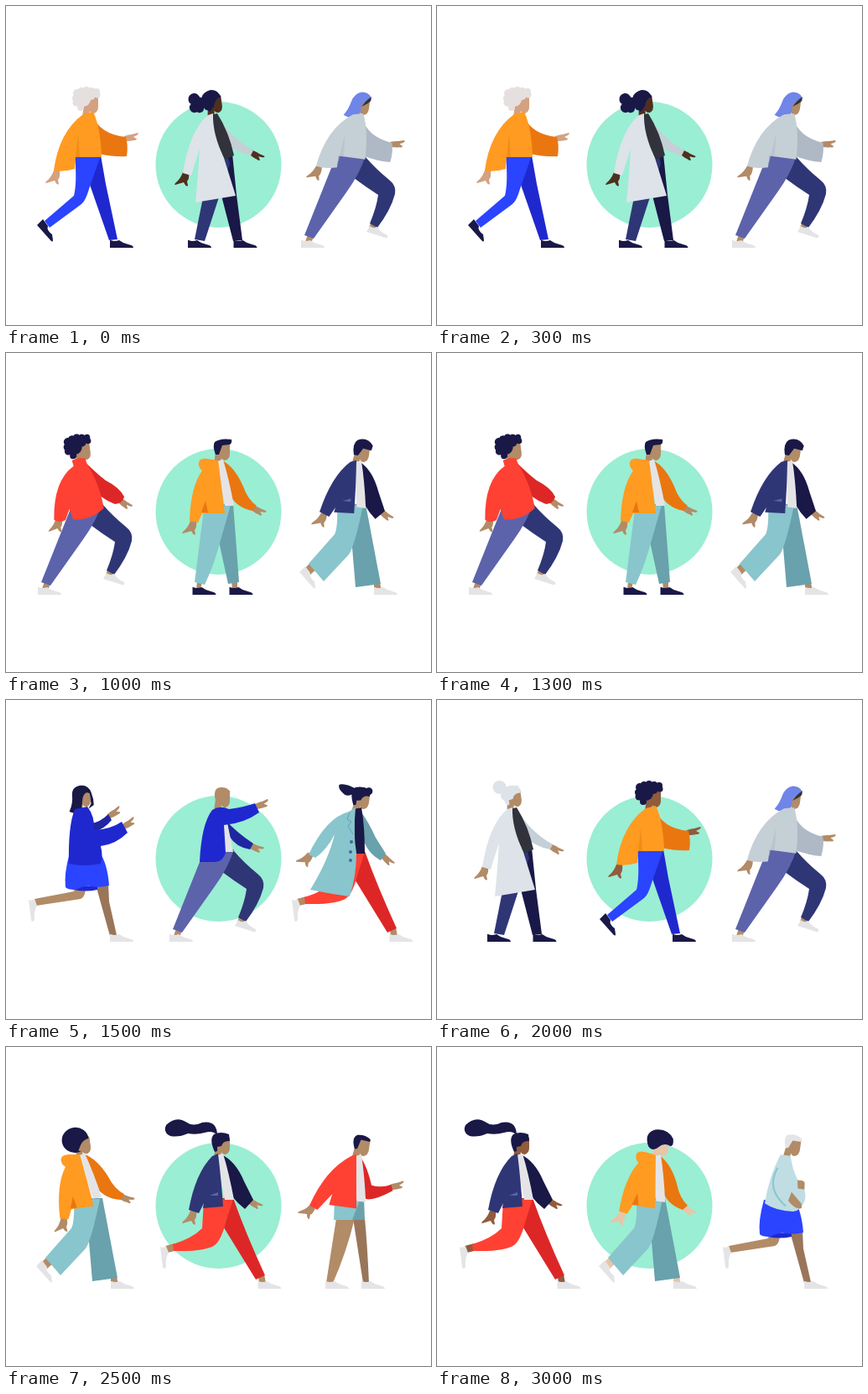
Recreate the animation shown at these times as an HTML page. Size 507 px wide and 380 px high, loop 3.5 s.

```html
<!DOCTYPE html>
<html lang="en">
<head>
<meta charset="utf-8">
<title>People walking</title>
<style>
html, body { margin: 0; height: 100%; overflow: hidden; background: #fff; }
svg { display: block; width: 100vw; height: 100vh; }
</style>
</head>
<body>
<svg id="stage" viewBox="0 0 507 380"></svg>
<script>
const navy = '#191847', indigo = '#2f3676', violet = '#5c63ab', blue = '#2b44ff', royal = '#1f28cf',
  red = '#ff4133', crimson = '#dd2727', orange = '#ff9b21', amber = '#ea7610', teal = '#89c5cc',
  sea = '#69a1ac', white = '#e4e4e6', pale = '#dde3e9', silver = '#c5cfd6', coal = '#31323b',
  tan = '#b28b67', shade = '#997659', brown = '#915b3c', dark = '#4f2f1f', peach = '#d4a181', fair = '#e8c4a8';

const p = (fill, d) => `<path fill="${fill}" d="${d}"/>`;
const at = (x, y, r, s) => `<g transform="translate(${x} ${y}) rotate(${r})">${s}</g>`;
const tilt = (deg, s) => `<g transform="rotate(${deg} 251 185)">${s}</g>`;
const dots = (fill, ...list) => list.map(([x, y, r]) => `<circle cx="${x}" cy="${y}" r="${r}" fill="${fill}"/>`).join('');

// Hands start at the wrist: one hangs behind, one reaches forward.
const hang = (c, x, y, r = 0) => at(x, y, r, p(c, 'M-4-2L3-3Q4 6 1 9L2 14Q0 16-3 10L-13 13Q-15 13-12 10Q-7 6-4-2Z'));
const reach = (c, x, y, r = 0) => at(x, y, r, p(c, 'M-2-3Q4-5 7-5L14-7Q16-6 13-4L9-2L13 0Q13 2 9 2Q6 3-2 3Z'));

const shoe = (c, x) => at(x, 278, 0, p(c, 'M0 1V10H28Q28 7 22 6Q16 5 11 1Q5 3 1 1Z'));
const toeOff = (c, x) => at(x, 254, 0, p(c, 'M7 0L0 7L16 25Q19 28 19 25L18 18Q11 13 13 8Z'));
const kick = p(white, 'M184 238Q188 240 191 237L194 245Q190 251 191 262Q188 266 187 262Z');

const legs = {
  slim: () => p(royal, 'M255 178H270L276 212L290 278L280 279L257 213Z') +
    p(blue, 'M239 178Q242 210 238 226L203 256L209 264L247 236Q252 232 256 218L270 178Z') +
    toeOff(navy, 194) + shoe(navy, 281),
  coat: () => p(navy, 'M257 176H270L275 225L282 279L271 280L257 226Z') +
    p(indigo, 'M243 176H264L267 188L237 280L225 278L235 228Z') + shoe(navy, 217) + shoe(navy, 271.5),
  lunge: c => p(c, 'M203 272L210 274L207 283L200 281ZM279 256L286 261L281 268L276 264Z') +
    p(indigo, 'M256 180H272Q284 194 300 207Q309 214 307 224Q302 243 286 264L277 259Q285 240 287 225L272 215L254 202Z') +
    p(violet, 'M237 178H272Q265 200 249 222L210 277L199 273Z') + shoe(white, 195) +
    p(white, 'M277 262L273 269L295 276Q299 277 298 273Q289 269 286 263Q282 266 277 262Z'),
  shorts: c => p(shade, 'M257 204H271Q274 235 276 281H269Z') + p(c, 'M237 204H259Q249 245 233 281H225Z') +
    p(sea, 'M255 180H270L271 206H254Z') + p(teal, 'M235 180H266L256 206H234Z') + shoe(white, 224) + shoe(white, 267),
  skirt: c => p(c, 'M239 222H252Q252 235 246 237L193 245L191 237L238 228Z') + kick +
    p(shade, 'M264 220L279 218L280 240L289 280L281 281Z') +
    p(royal, 'M232 222H266V226Q252 229 238 226Z') +
    p(blue, 'M233 182H269Q278 195 280 221Q270 224 258 222Q250 221 240 226Q230 226 228 223Q226 207 233 182Z') + shoe(white, 281),
  straight: c => p(c, 'M228 272H234L232 282H227ZM269 272H276V282H270Z') + p(sea, 'M253 180H271L278 273L265 275L253 220Z') +
    p(teal, 'M236 186L225 273L237 276Q247 255 254 230L268 181Z') + shoe(navy, 222.5) + shoe(navy, 266.5),
  wide: c => p(c, 'M206 250L214 257L206 264L199 257ZM282 274H289L291 282H282Z') +
    p(sea, 'M255 180H272L290 275L260 279L255 220Z') +
    p(teal, 'M238 182Q239 208 235 216L204 251L222 272L252 240Q259 230 269 181Z') + toeOff(white, 193) + shoe(white, 282),
  jog: c => p(c, 'M190 237L201 234V243L193 245ZM301 273L308 271L310 281L302 282Z') + kick +
    p(crimson, 'M256 180H271Q286 222 309 272L298 277L258 212Z') +
    p(red, 'M236 182L234 216Q222 228 199 235L200 243Q238 244 249 236Q257 230 263 206L271 181Z') + shoe(white, 300.5),
};

const shirt = p(white, 'M251 129L259 127Q266 150 272 182H261Z');
const poncho = (main, side, fold) => c => hang(c, 218, 198) + reach(c, 300, 158) +
  p(side, 'M260 130Q269 153 300 156Q303 167 301 179Q286 180 268 176Z') +
  p(main, 'M249 129L261 126Q270 145 271 180H239V194Q226 198 214 196Q220 150 249 129Z') + p(fold, 'M243 152L245 180H239V191Z');

// Each top: [tilt it is drawn at, drawing for a skin colour]
const tops = {
  poncho: [0, poncho(orange, amber, '#f18c18')],
  shawl: [0, poncho(silver, '#afb9c5', '#b9c4cd')],
  coat: [-8, c => hang(c, 215, 200) + reach(c, 293, 175, 40) +
    p(silver, 'M252 130Q268 157 295 172L292 178Q274 175 258 160Z') +
    p(coal, 'M244 130L252 128Q266 150 272 178L261 183L250 160Z') +
    p(pale, 'M241 130L247 128Q246 152 260 181L274 226Q250 230 226 234Q229 204 231 170L221 202L211 199Q219 148 241 130Z')],
  turtle: [8, c => hang(c, 218, 190, 12) + reach(c, 294, 188, 62) +
    p(crimson, 'M266 131Q276 149 284 160Q298 173 300 185Q295 192 287 190Q270 178 266 160Z') +
    p(red, 'M252 126Q260 124 268 128L268 134Q276 162 273 191Q254 201 234 194L233 181L225 192Q217 194 212 188Q224 143 252 133Z')],
  bump: [-8, c => p('#bfdde3', 'M237 130L249 128Q255 142 264 152Q279 160 280 174Q279 188 270 191Q250 196 235 191Q231 160 237 130Z') +
    '<path fill="none" stroke="#89c5cc" stroke-width="2" d="M238 146Q231 174 260 187"/>' +
    p(c, 'M265 154Q271 151 274 154L276 162L268 163ZM262 169L277 179L279 184Q273 189 261 180Z')],
  jacket: [0, c => hang(c, 210, 197, 16) + reach(c, 300, 160, -10) +
    p(crimson, 'M258 129Q268 140 276 161Q288 163 299 157L302 164Q280 180 271 178Q264 172 261 160Z') + shirt +
    p(red, 'M247 130L253 127Q256 150 262 191H229L231 178L216 199L206 195Q219 150 247 130Z')],
  hoodie: [0, c => hang(c, 224, 202) + reach(c, 295, 185, 38) +
    p(amber, 'M258 128Q273 136 283 159Q288 174 299 182L294 188Q273 184 265 165Z') + shirt +
    p(orange, 'M230 130Q232 125 240 126L253 128Q256 150 261 191H234L229 202L219 200Q220 160 234 140Q229 136 230 130Z') +
    p(amber, 'M238 176L241 190H233Z')],
  blazer: [0, c => hang(c, 224, 197) + reach(c, 291, 184, 40) +
    p(navy, 'M257 128Q274 136 284 160L295 182L285 193Q268 180 264 165Z') + shirt +
    p(indigo, 'M246 130L253 127Q257 160 259 190L235 192L236 186L230 198L218 194Q226 150 246 130Z') +
    p(violet, 'M243 177L253 173V177Z')],
  sweater: [-8, c => reach(c, 281, 138, -22) + reach(c, 298, 151, -22) + p('#2026a2', 'M258 147Q269 146 279 136L283 143Q274 154 262 157Z') +
    p(royal, 'M239 130L254 127Q263 138 262 155Q282 154 295 145L302 158Q288 172 270 174Q273 186 270 195Q250 199 232 195Q231 150 239 130Z')],
  pointing: [0, c => reach(c, 299, 127, -8) + reach(c, 292, 174, 32) +
    p('#2026a2', 'M262 143Q274 157 295 171L291 178Q274 175 267 163Z') + p(white, 'M257 144L264 146L271 181H258Z') +
    p(royal, 'M246 131Q255 125 266 130Q283 128 297 123L302 134Q284 147 260 149L262 182Q259 192 250 193H231Q233 148 246 131Z')],
  trench: [8, c => hang(c, 206, 185, 20) + reach(c, 293, 186, 55) +
    p(sea, 'M265 131Q276 146 284 164L296 183L290 191Q273 182 268 162Z') + p(navy, 'M258 130L267 128Q271 150 271 183H259Z') +
    p(teal, 'M252 133L260 128Q257 160 261 182Q261 210 253 234Q230 231 206 226Q228 190 235 160Q226 178 212 188L204 184Q225 140 252 133Z') +
    '<path fill="none" stroke="#69a1ac" d="M253 134L250 142L255 145L251 150L257 160"/>' + dots('#4a62a8', [255, 169, 2], [254, 181, 2], [254, 191, 2])],
};

const face = c => p(c, 'M248 132L250 118Q248 107 256 106L267 108V120Q267 126 262 128Q258 128 257 125L256 131Z');
const cap = c => p(c, 'M249 125Q242 110 248 104Q256 100 266 104L267 112Q259 111 257 118L252 119L252 124Z');
const curls = c => dots(c, [242, 104, 5], [247, 101, 4], [253, 100, 4], [259, 101, 4], [265, 102, 4], [266, 106, 3.5],
  [240, 110, 4], [241, 115, 4.5], [246, 121, 4], [249, 111, 9], [258, 106, 6]);

const hair = {
  curls: () => curls(navy),
  greyCurls: () => curls('#e5e0df'),
  blond: () => dots('#ecdcbf', [243, 103, 8], [241, 113, 6], [250, 110, 9], [254, 104, 6], [263, 106, 6], [247, 119, 5]),
  lowBun: () => dots(navy, [235, 108, 7], [234, 118, 6], [242, 114, 7], [240, 120, 5]) + p(navy, 'M246 122Q238 103 255 100Q264 100 267 110Q260 110 257 120L252 125Z'),
  topBun: () => cap(navy) + dots(navy, [247, 104, 7]),
  greyBun: () => cap(pale) + dots(pale, [243, 102, 8], [249, 113, 6]),
  beard: () => p(navy, 'M247 123Q242 107 249 103Q256 101 262 103V108Q257 109 256 115L260 120Q266 116 267 119V126Q258 129 254 121Z'),
  flat: () => p(navy, 'M250 121Q246 110 249 106Q256 101 269 103Q270 107 267 109L258 110L254 121Z'),
  crop: () => p(navy, 'M249 121Q245 108 251 103Q262 97 270 107L269 113L259 112L254 121Z'),
  bob: () => p(navy, 'M240 131Q246 121 246 112Q247 101 259 102Q267 103 269 112Q271 120 270 127L263 131L267 125V113Q262 108 258 117L254 133Q246 135 240 131Z'),
  bald: c => p(c, 'M250 120Q246 104 257 104Q267 104 267 112V120Z'),
  pony: () => cap(navy) + dots(navy, [265, 106, 4.5]) + p(navy, 'M250 110Q242 116 237 114Q227 108 229 103Q236 100 251 106Z'),
  afro: () => `<ellipse cx="250" cy="110" rx="16" ry="15" fill="${navy}"/>` +
    p(tan, 'M267 110Q259 111 256 116L252 123L257 125Q258 128 262 128Q267 126 267 120Z'),
  flying: () => cap(navy) + p(navy, 'M251 104Q246 99 237 102Q227 105 217 103Q206 108 196 106Q187 102 191 93Q203 81 216 90Q223 95 234 90Q251 87 252 104Z'),
  buzz: () => p(navy, 'M250 121Q244 108 251 104Q260 102 267 107V110L256 109L253 120Z'),
  mushroom: () => p(navy, 'M243 119Q235 104 248 98Q263 94 271 106Q273 114 269 115Q261 111 255 118Q249 125 243 119Z'),
  white: () => p(white, 'M250 120Q245 108 250 104Q260 101 267 106V110H257L253 119Z'),
  hijab: () => p('#6f85e8', 'M268 106Q264 100 256 101Q247 104 245 114Q243 124 238 131Q248 136 257 128L258 115Z') + p(coal, 'M268 105Q262 110 258 118Q265 114 268 110Z'),
};

// Three people per scene: [legs, top, hair, tilt, skin]
const scenes = [
  [['slim', 'poncho', 'greyCurls', 0, peach], ['coat', 'coat', 'lowBun', -8, dark], ['lunge', 'shawl', 'hijab', 8]],
  [['shorts', 'bump', 'beard', -8], ['skirt', 'jacket', 'topBun', 0], ['slim', 'turtle', 'blond', 8]],
  [['lunge', 'turtle', 'curls', -8], ['straight', 'hoodie', 'flat', 0], ['wide', 'blazer', 'crop', 8]],
  [['skirt', 'sweater', 'bob', -8], ['lunge', 'pointing', 'bald', 0], ['jog', 'trench', 'pony', 8]],
  [['coat', 'coat', 'greyBun', -8], ['slim', 'poncho', 'curls', 0, brown], ['lunge', 'shawl', 'hijab', 8]],
  [['wide', 'hoodie', 'afro', -8], ['jog', 'blazer', 'flying', 0], ['shorts', 'jacket', 'buzz', 8]],
  [['jog', 'blazer', 'flying', 0, brown], ['wide', 'hoodie', 'mushroom', 8, fair], ['skirt', 'bump', 'white', 8]],
];

function person([leg, top, style, lean, skin = tan], column) {
  const [drawnAt, draw] = tops[top];
  return at(157 * (column - 1), 0, 0,
    legs[leg](skin) + tilt(lean, face(skin) + hair[style](skin)) + tilt(lean - drawnAt, draw(skin)));
}

const stage = document.getElementById('stage');
stage.innerHTML = dots('#9aeed3', [253.5, 189, 75]) +
  scenes.map(people => `<g class="scene">${people.map(person).join('')}</g>`).join('');
const groups = [...stage.querySelectorAll('.scene')];

function show() {
  const current = Math.floor(performance.now() / 500) % scenes.length;
  groups.forEach((g, i) => g.style.display = i === current ? '' : 'none');
  requestAnimationFrame(show);
}
show();
</script>
</body>
</html>
```
